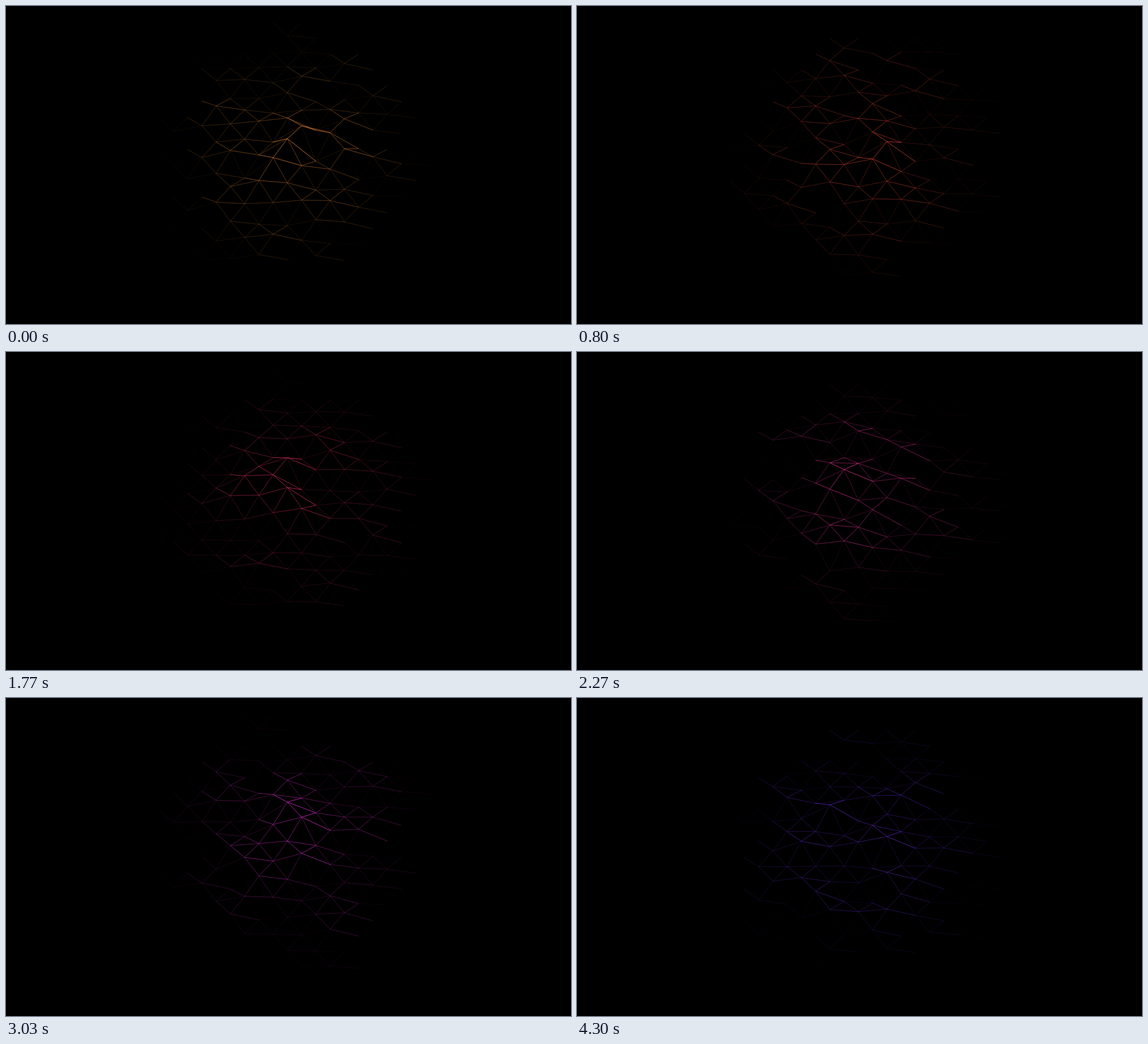
These frames come from a looping animation (998 px wide and 561 px high, 4330 ms). An HTML page with a canvas:

```html
<!DOCTYPE html>
<html lang="en">
<head>
<meta charset="utf-8">
<title>Mesh</title>
<style>
  html, body { margin: 0; height: 100%; background: #000; overflow: hidden; }
  canvas { display: block; }
</style>
</head>
<body>
<canvas id="stage" width="998" height="561"></canvas>
<script>
const ctx = document.getElementById('stage').getContext('2d');
const LOOP = 4330, FPS = 30, FRAMES = 130;
const CX = 497, CY = 272, HALF = 25.17, ROW = 28;
const ROWS = 20, REACH = 12;   // columns counted in half steps from the centre
const KEY = 9;                 // frames between two random heights of a node

function rand(a, b, c) {
  const s = Math.sin(a * 127.1 + b * 311.7 + c * 74.7 + 5.3) * 43758.5453;
  return s - Math.floor(s);
}

// Smooth random value in -1..1, each node with its own phase
function wobble(col, row, frame) {
  const p = frame / KEY + rand(col, row, -1);
  const k = Math.floor(p), f = p - k;
  const a = rand(col, row, k), b = rand(col, row, k + 1);
  return 2 * (a + (b - a) * f * f * (3 - 2 * f)) - 1;
}

// Nodes rise from their resting place, most of all near the centre
function node(col, row, frame) {
  const x = CX + col * HALF, y = row * ROW + 1;
  const d = Math.hypot(x - CX, y - CY);
  const swing = 23 * Math.max(0, 1 - d / 320) * wobble(col, row, frame);
  const lift = Math.max(0, 31 * (1 - d / 208) + swing);
  return { x, y: y - lift, lift };
}

// Orange to violet through red, slower while red
function hueAt(frame) {
  return (388 - frame + 8 * Math.sin(Math.PI * frame / FRAMES)) % 360;
}

function draw(frame) {
  ctx.fillStyle = '#000';
  ctx.fillRect(0, 0, 998, 561);
  ctx.lineWidth = 1;
  const hue = hueAt(frame);
  for (let row = 1; row < ROWS; row++) {
    for (let col = -REACH + row % 2; col <= REACH; col += 2) {
      const p = node(col, row, frame);
      if (p.lift < 0.5) continue;
      // A raised node lights its edges to the upper left, upper right and right
      const ends = [[col - 1, row - 1], [col + 1, row - 1], [col + 2, row]];
      ctx.strokeStyle = `hsla(${hue}, 65%, 48%, ${Math.min(1, p.lift / 50)})`;
      ctx.beginPath();
      for (const [c, r] of ends) {
        const q = node(c, r, frame);
        ctx.moveTo(p.x, p.y);
        ctx.lineTo(q.x, q.y);
      }
      ctx.stroke();
    }
  }
}

function tick() {
  const t = performance.now() % LOOP;
  draw(Math.floor((t + 3.4) * FPS / 1000));
  requestAnimationFrame(tick);
}
tick();
</script>
</body>
</html>
```
